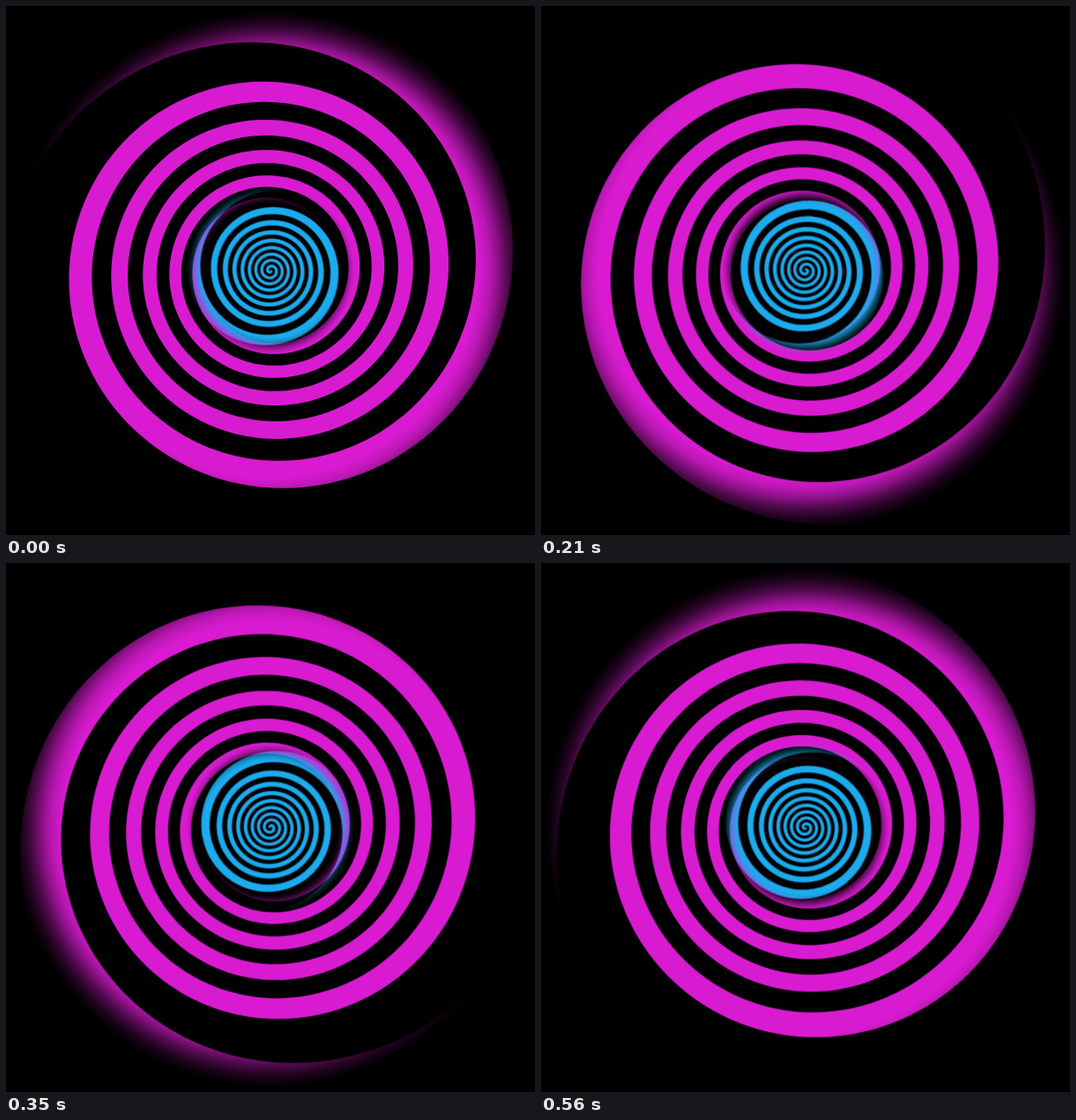
An HTML page for the animation above (0.63 s loop, 600 px wide and 600 px high).

```html
<!DOCTYPE html>
<html lang="en">
<head>
<meta charset="utf-8">
<title>Hypnotic spiral</title>
<style>
  html, body { margin: 0; width: 100%; height: 100%; overflow: hidden; background: #000; }
  svg { display: block; width: 100vw; height: 100vh; }
  .spin { animation: spin 630ms steps(9, end) infinite; transform-origin: 0 0; }
  @keyframes spin { from { transform: rotate(0deg); } to { transform: rotate(360deg); } }
</style>
</head>
<body>
<svg viewBox="0 0 600 600">
  <defs>
    <radialGradient id="fade" gradientUnits="userSpaceOnUse" cx="0" cy="0" r="294">
      <stop offset=".80" stop-color="#fff"/>
      <stop offset=".845" stop-color="#fff" stop-opacity=".86"/>
      <stop offset=".88" stop-color="#fff" stop-opacity=".64"/>
      <stop offset=".915" stop-color="#fff" stop-opacity=".38"/>
      <stop offset=".955" stop-color="#fff" stop-opacity=".15"/>
      <stop offset="1" stop-color="#fff" stop-opacity="0"/>
    </radialGradient>
    <mask id="disc" maskUnits="userSpaceOnUse" x="-300" y="-300" width="600" height="600">
      <circle r="294" fill="url(#fade)"/>
    </mask>
  </defs>
  <g transform="translate(300 300)">
    <g mask="url(#disc)">
      <circle r="300"/>
      <g class="spin"><path class="arm" fill="#d81bd0"/></g>
    </g>
    <!-- small mirrored copy, so it turns the other way -->
    <g transform="scale(-.324 .324) rotate(51)" mask="url(#disc)">
      <circle r="300"/>
      <g class="spin"><path class="arm" fill="#1cabee"/></g>
    </g>
  </g>
</svg>
<script>
  // Radii of the two edges of the arm after a number of turns inward.
  const TURNS = 8.87;
  const spiral = left => 182.6 * Math.tan(0.1095 * Math.max(0, left));
  const outer = t => spiral(TURNS - t) * Math.exp(0.2 * Math.exp(-3.5 * t));
  const inner = t => spiral(TURNS - 0.5 - t) * Math.exp(0.08 * Math.exp(-3.6 * t));

  const FIRST = -0.22, STEPS = 1600;

  function edge(radius) {
    return Array.from({ length: STEPS + 1 }, (_, i) => {
      const t = FIRST + (TURNS - FIRST) * i / STEPS;
      const r = radius(t);
      const a = 2 * Math.PI * t;
      return (r * Math.sin(a)).toFixed(2) + " " + (-r * Math.cos(a)).toFixed(2);
    });
  }

  const outline = "M" + [...edge(outer), ...edge(inner).reverse()].join("L") + "Z";
  document.querySelectorAll(".arm").forEach(arm => arm.setAttribute("d", outline));
</script>
</body>
</html>
```
